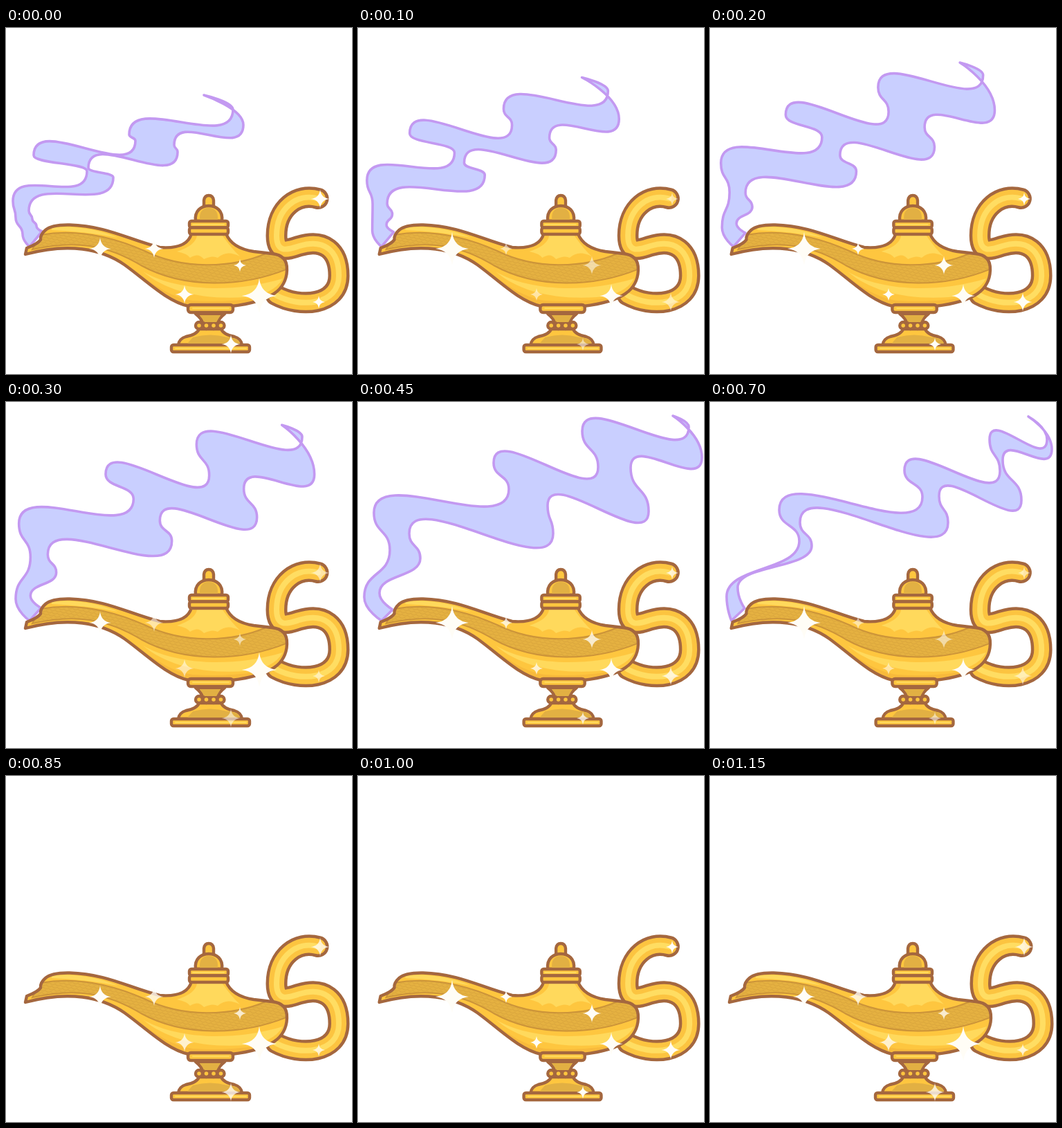
Recreate the animation shown at these times as an HTML page. Size 500 by 500 pixels, loop 1200 ms.

```html
<!DOCTYPE html>
<html lang="en">
<head>
<meta charset="utf-8">
<title>Magic lamp</title>
<style>
  html, body { margin: 0; width: 100%; height: 100%; overflow: hidden; background: #fff; }
  svg { display: block; width: 100%; height: 100%; }
  .line { stroke: #a4673f; stroke-width: 4.4; stroke-linejoin: round; stroke-linecap: round; }
  .gold { fill: #fec63f; }
  .dark { fill: #e2b043; }
  .light { fill: #ffd95c; }
  .none { fill: none; }
</style>
</head>
<body>
<svg viewBox="0 0 500 500">
  <defs>
    <path id="handle" d="M451 246.500C421 238 391 260 391 300C391 327 408 320 424 315C460 304 481 322 481 358C481 401 425 405 390 386"/>
    <path id="body" d="M28 327L30 318Q46 312 50 306Q49 299 57 292Q66 284 92 284.500C145 286 178 306 222 317Q262 320 268 297H318Q326 318 358 323L384 326Q407 328 406 350C405 378 384 395 326 402H264C232 395 203 365 171 342C138 319 90 310 28 327Z"/>
    <clipPath id="inside"><use href="#body"/></clipPath>
    <pattern id="scales" width="8" height="8" patternUnits="userSpaceOnUse" patternTransform="rotate(12)">
      <rect width="8" height="8" fill="#e5b141"/>
      <path d="M0 3Q4 7 8 3M-4 7Q0 11 4 7M4 7Q8 11 12 7M-4 -1Q0 3 4 -1M4 -1Q8 3 12 -1" fill="none" stroke="#d6a13a" stroke-width=".9"/>
    </pattern>
  </defs>

  <path id="smoke" fill="#c9cfff" stroke="#c399f1" stroke-width="3.6" stroke-linejoin="round"/>

  <g id="lamp">
    <g fill="none" stroke-linecap="round">
      <use href="#handle" stroke="#a4673f" stroke-width="31"/>
      <use href="#handle" stroke="#fcc440" stroke-width="22"/>
      <use href="#handle" stroke="#ffdd62" stroke-width="8"/>
    </g>

    <use href="#body" class="gold"/>
    <g clip-path="url(#inside)">
      <path class="light" d="M276 299Q275 314 247 323Q262 326 266 332Q278 324 286 334Q298 328 306 332Q319 320 338 330Q326 319 312 299Z"/>
      <path class="light" d="M198 352C240 377 320 386 400 362Q386 386 345 389C285 393 232 381 198 352Z"/>
      <path fill="#f8ba3b" d="M180 345C218 377 246 391 270 394Q340 398 388 384L370 410H250Z"/>
      <path class="light" d="M66 289Q112 283 162 303Q115 294 66 292Z"/>
      <path d="M50 299C100 290 150 300 200 322C255 349 325 348 378 325L412 322V346C340 377 255 376 195 343C145 313 100 306 38 320Z" fill="url(#scales)" stroke="#cc9439" stroke-width="2"/>
    </g>
    <use href="#body" class="line none"/>

    <g class="line gold">
      <path d="M274 413Q284 421 284 427H306Q306 421 316 413Z"/>
      <path d="M279 435Q276 443 260 446Q250 449 249 458H341Q340 449 330 446Q314 443 311 435Z"/>
      <rect x="263" y="400" width="65" height="11" rx="4"/>
      <rect x="239" y="458" width="113" height="10" rx="3"/>
      <circle cx="279" cy="430" r="5"/><circle cx="289.500" cy="430" r="5"/>
      <circle cx="300" cy="430" r="5"/><circle cx="310.500" cy="430" r="5"/>
      <path d="M286 258V249Q287 242 293 242Q299 242 300 249V258Z"/>
      <path d="M274 279C272 264 282 257 293 257S314 264 312 279Z"/>
      <rect x="265" y="279" width="56" height="9.500" rx="3"/>
      <rect x="265" y="288.500" width="56" height="9.500" rx="3"/>
    </g>
    <path class="dark" d="M280 277Q279 260 293 260T306 277Z"/>
    <path class="dark" d="M280 415H310L304 425H287Z"/>
    <path class="dark" d="M270 447Q295 440 320 447Q337 448 338 456H262Z"/>
    <path d="M245 463H347M270 405H322M270 284H315" stroke="#ffd95c" stroke-width="2" stroke-linecap="round"/>
  </g>
  <g id="stars" fill="#fffdf6"></g>
</svg>

<script>
const LOOP = 1200, STEP = 50;
const TIP = 9, LAST = 18;
const smoke = document.getElementById('smoke');
const lamp = document.getElementById('lamp');
const lerp = (a, b, k) => a + (b - a) * k;
const pose = s => s.split(' ').map(p => p.split(',').map(Number));

// Turning points of the smoke: up the left side to the tip, down the right side.
const rise = pose('34,316 24,298 14,274 10,250 117,207 40,184 187,163 178,154 328,118 286,97 343,140 243,169 248,179 119,202 155,216 33,264 38,276 44,286 52,294');
const drift = pose('34,316 9,282 46,214 23,160 218,126 196,88 347,94 324,42 478,36 455,20 497,80 394,95 420,158 274,150 282,190 74,190 90,226 31,276 50,300');
const thin = pose('31,316 24,281 129,201 100,156 307,137 281,99 419,100 404,54 487,54 460,21 494,68 423,84 450,142 331,136 344,174 130,174 147,208 40,268 50,298');
// Opposite points meet halfway as the smoke fades out.
const wisp = thin.map((p, i) => p.map((v, axis) => (v + thin[LAST - i][axis]) / 2));

const blend = (a, b, kx, ky = () => kx) =>
  a.map((p, i) => [lerp(p[0], b[i][0], kx), lerp(p[1], b[i][1], ky(i))]);

function smokeAt(t) {
  if (t < 450) {
    // The upper edge billows ahead and the lower edge lags behind.
    const u = t / 450, lead = 1 - (1 - u) ** 1.6, lag = u ** 1.3;
    return blend(rise, drift, u, i => i <= TIP ? lead : lag);
  }
  if (t < 700) return blend(drift, thin, (t - 450) / 250);
  if (t < 850) return blend(thin, wisp, (t - 700) / 150);
  return null;
}

// Every turning point has a vertical tangent, except the tip and the two ends.
function outline(pts) {
  let d = 'M' + pts[0];
  for (let i = 0; i < LAST; i++) {
    const [ax, ay] = pts[i], [bx, by] = pts[i + 1];
    const m = Math.min(i, LAST - 1 - i);
    const swings = m > 2 && m % 2;
    const h = swings ? 5 * Math.sqrt(Math.abs(bx - ax)) : 0.55 * Math.abs(by - ay);
    const pull = i < TIP ? -h : h;
    const out = i % TIP === 0 ? 0 : pull;
    const into = i % TIP === TIP - 1 ? 0 : pull;
    d += `C${ax},${ay + out} ${bx},${by - into} ${bx},${by}`;
  }
  return d + 'Z';
}

function star(x, y, size, phase, twinkles) {
  const el = document.createElementNS('http://www.w3.org/2000/svg', 'path');
  el.setAttribute('d', 'M0-1Q.1-.1 1 0Q.1 .1 0 1Q-.1 .1-1 0Q-.1-.1 0-1Z');
  document.getElementById('stars').append(el);
  return (beat, glow) => {
    el.setAttribute('transform', `translate(${x} ${y}) scale(${size * (1 + 0.2 * phase * beat)})`);
    el.setAttribute('opacity', twinkles ? glow : 1);
  };
}
const small = (x, y, phase) => star(x, y, 11.2, phase, true);
const stars = [
  small(454, 247, 1), small(214, 319, 1), small(258, 385, 1), small(325, 457, 1),
  small(338, 343, -1), small(452, 396, -1),
  star(136, 319, 20, -1), star(366, 387, 21, 1)
];

function draw(now) {
  const i = Math.floor(now % LOOP / STEP);
  const beat = (i + 1) % 6 < 3 ? 1 : -1;
  const glow = 0.78 + 0.22 * Math.cos(i * Math.PI / 2);
  const pts = smokeAt(i * STEP);
  smoke.setAttribute('d', pts ? outline(pts) : '');
  lamp.setAttribute('transform', beat > 0 ? '' : 'translate(3 0) scale(.99 1)');
  stars.forEach(show => show(beat, glow));
}

const start = performance.now();
function tick() {
  draw(performance.now() - start);
  requestAnimationFrame(tick);
}
tick();
</script>
</body>
</html>
```
